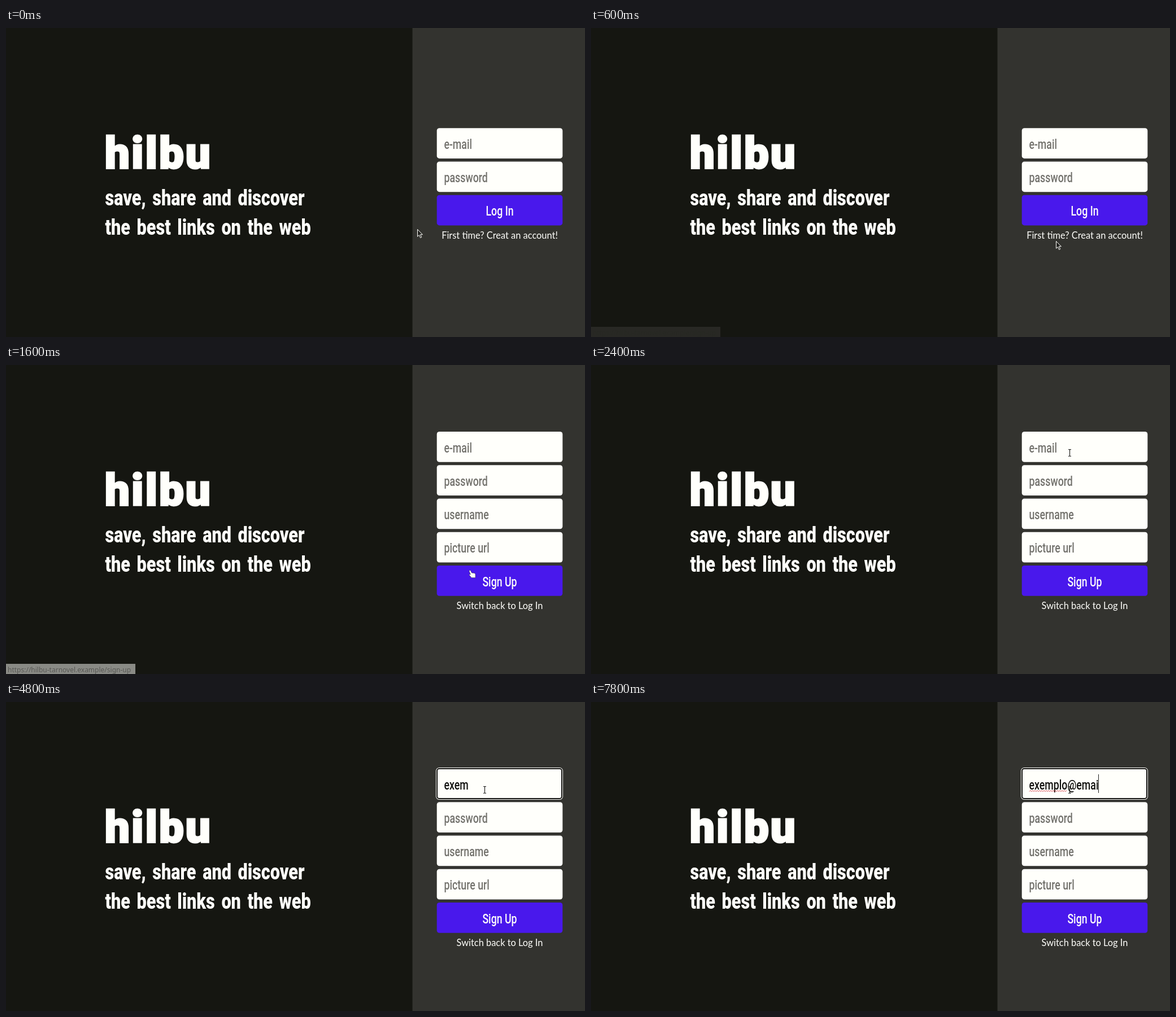
Recreate the animation shown at these times as an HTML page. Size 1025 px wide and 547 px high, loop 8000 ms.

```html
<!DOCTYPE html>
<html lang="en">
<head>
<meta charset="utf-8">
<title>Sign up</title>
<style>
  html, body { margin: 0; width: 100%; height: 100%; overflow: hidden; background: #151611; }
  svg { display: block; width: 100%; height: 100%; }
  text { white-space: pre; }
  .brand { font: 900 78px Roboto, sans-serif; letter-spacing: 3px; fill: #fffffb; stroke: #fffffb; stroke-width: 3; }
  .tagline { font: 800 38px Roboto, sans-serif; word-spacing: 5px; fill: #fffffb; }
  .label { font: 500 24px Roboto, sans-serif; fill: #73726d; }
  .typed { fill: #11110f; }
  .button { fill: #fffffb; text-anchor: middle; }
  .link { font: 16.4px Lato, sans-serif; fill: #fffffb; text-anchor: middle; }
  .url { font: 12px "Noto Sans", sans-serif; fill: #333330; }
</style>
</head>
<body>
<svg id="stage" viewBox="0 0 1025 547">
  <rect width="1025" height="547" fill="#151611"/>
  <rect x="719.5" width="305.5" height="547" fill="#33332f"/>
  <text class="brand" x="175" y="247.5">hilbu</text>
  <text class="tagline" transform="translate(175.5 313.5) scale(.805 1)">save, share and discover</text>
  <text class="tagline" transform="translate(175.5 365.5) scale(.805 1)">the best links on the web</text>

  <g id="login"></g>
  <g id="signup"></g>

  <g id="focus">
    <rect x="761" y="116" width="225" height="57" rx="6" fill="#fffffb"/>
    <rect x="762" y="117" width="223" height="55" rx="5" fill="#11110f"/>
    <rect x="764" y="119" width="219" height="51" rx="3" fill="#fffffb"/>
    <text id="hint" class="label">e-mail</text>
    <text id="typed" class="label typed"></text>
    <path id="squiggle" fill="none" stroke="#d8434a"/>
    <rect id="caret" y="128" width="1" height="33" fill="#22221f"/>
  </g>

  <g id="status">
    <rect y="529" width="229" height="18" fill="#fdfdf9"/>
    <text id="url" class="url" x="3" y="543.5">https://hilbu-tarnovel.example/sign-up</text>
  </g>

  <g id="cursor">
    <path id="arrow" d="M.5 .5V13.2L3.4 10.5L5.6 15.4L7.7 14.4L5.5 9.7H9.4Z" fill="#22221f" stroke="#fffffb"/>
    <path id="hand" d="M1 .8Q2.4 0 3.2 1.5L5 5L9.5 5.4Q11.5 5.8 11.5 8V13.5H4.5L.7 8.8Q.2 7.4 1.8 7.4L3 8L.6 2.2Q.4 1.2 1 .8Z" fill="#fffffb" stroke="#33332f" stroke-width=".5"/>
    <path id="beam" d="M-2.5 -6H-.8L0 -5.2L.8 -6H2.5M0 -5.2V5.2M-2.5 6H-.8L0 5.2L.8 6H2.5" fill="none" stroke="#22221f" stroke-width="1.2"/>
  </g>
</svg>
<script>
const LOOP = 8000, CONDENSED = .74, TEXT_X = 775.5, BASELINE = 36.5, FIELD_PITCH = 59.25;
const $ = id => document.getElementById(id);
const show = (id, visible) => $(id).style.display = visible ? '' : 'none';
const condensedAt = (x, y) => `translate(${x} ${y}) scale(${CONDENSED} 1)`;

function buildForm(id, top, labels, action, link) {
  const box = (y, fill) => `<rect x="762.7" y="${y}" width="222.6" height="53.7" rx="4.5" fill="${fill}"/>`;
  const label = (x, y, text, extra = '') =>
    `<text class="label ${extra}" transform="${condensedAt(x, y + BASELINE)}">${text}</text>`;
  let y = top, html = '';
  for (const text of labels) {
    html += box(y, '#fffffb') + label(TEXT_X, y, text);
    y += FIELD_PITCH;
  }
  html += box(y, '#4918ec') + label(874, y, action, 'button');
  $(id).innerHTML = html + `<text class="link" x="874" y="${y + 77}">${link}</text>`;
}

buildForm('login', 177.2, ['e-mail', 'password'], 'Log In', 'First time? Creat an account!');
buildForm('signup', 118, ['e-mail', 'password', 'username', 'picture url'], 'Sign Up', 'Switch back to Log In');
for (const id of ['hint', 'typed']) $(id).setAttribute('transform', condensedAt(TEXT_X, 118 + BASELINE));

// Each entry holds from its time until the next one.
const pointer = [
  [0, 728, 356, 'arrow'], [100, 741, 358, 'arrow'], [200, 763, 362, 'arrow'],
  [300, 788, 366, 'hand'], [400, 808, 371, 'hand'], [500, 820, 376, 'arrow'],
  [600, 823, 377, 'arrow'], [900, 832, 366, 'hand'], [1000, 825, 364, 'hand'],
  [1100, 819.5, 363, 'hand'], [2000, 815, 363, 'hand'], [2100, 819, 318, 'beam'],
  [2200, 829, 250, 'beam'], [2300, 842, 180, 'beam'], [2400, 847.5, 155.5, 'beam']
];
const statusOpacity = [
  [0, 0], [400, .6], [500, .5], [600, .08], [700, 0],
  [1100, .1], [1300, 1], [1600, .5], [1700, 0]
];
const address = 'exemplo@emai';
const keyTimes = [3500, 3800, 4000, 4200, 5300, 5400, 5700, 7000, 7500, 7600, 7700, 7800];
const FOCUS_TIME = 3000, BLINK = 600, BLINK_START = 2700;

const at = (track, t) => track.findLast(entry => t >= entry[0]);

function squigglePath(width) {
  let d = `M${TEXT_X + .5} 158.5`;
  for (let x = 2, up = true; x <= width; x += 2, up = !up) d += `l2 ${up ? -2 : 2}`;
  return d;
}

function drawTyping(t) {
  show('focus', t >= FOCUS_TIME);
  if (t < FOCUS_TIME) return;
  const pressed = keyTimes.filter(time => t >= time);
  const count = pressed.length;
  const lastKey = count ? pressed[count - 1] : BLINK_START;
  const typed = $('typed');
  typed.textContent = address.slice(0, count);
  show('hint', !count);

  const width = n => n ? typed.getSubStringLength(0, n) * CONDENSED : 0;
  $('caret').setAttribute('x', Math.round(TEXT_X + width(count)));
  show('caret', Math.floor((t - lastKey) / BLINK) % 2 === 0);

  // The spelling mark waits for a pause, then stays once the word is complete.
  const wordLength = Math.min(count, address.indexOf('@'));
  const misspelled = count > wordLength || (count > 1 && t - lastKey >= 1000);
  show('squiggle', misspelled);
  if (misspelled) $('squiggle').setAttribute('d', squigglePath(width(wordLength)));
}

function draw() {
  const t = performance.now() % LOOP;
  show('login', t < 1500);
  show('signup', t >= 1500);
  const opacity = at(statusOpacity, t)[1];
  for (const id of ['status', 'url']) $(id).setAttribute('opacity', opacity);
  drawTyping(t);
  const [, x, y, shape] = at(pointer, t);
  $('cursor').setAttribute('transform', `translate(${x} ${y})`);
  for (const id of ['arrow', 'hand', 'beam']) show(id, id === shape);
  requestAnimationFrame(draw);
}
draw();
</script>
</body>
</html>
```
